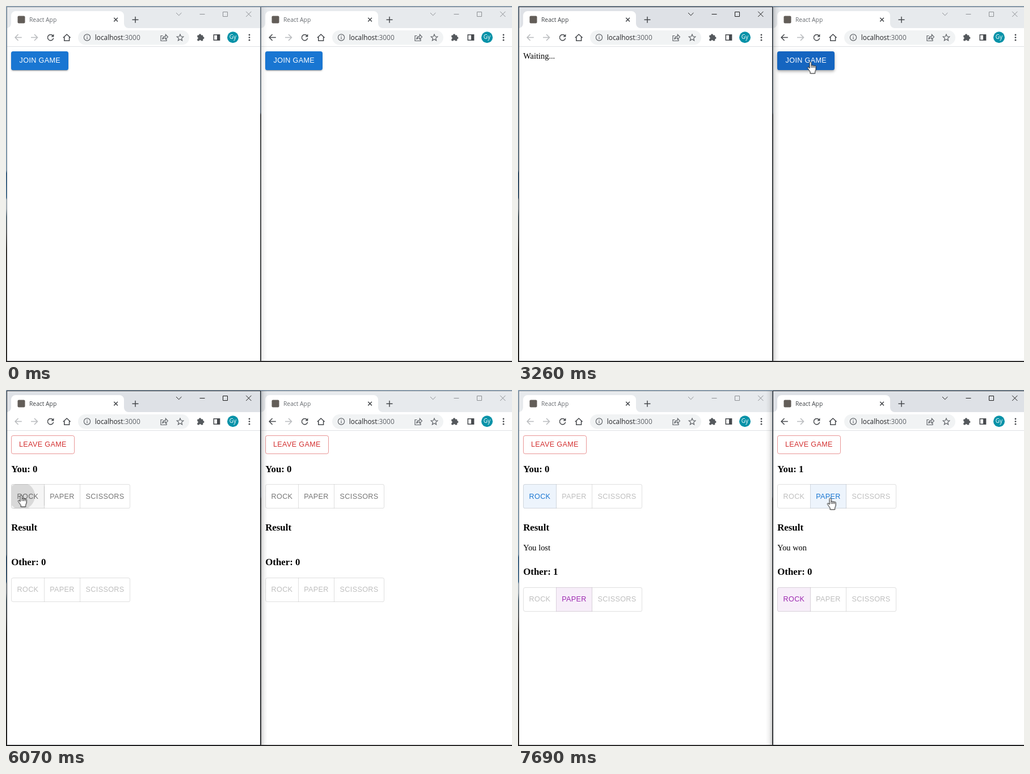
An HTML page that plays this animation: 892x628 px, repeating every 8 s.

```html
<!DOCTYPE html>
<html lang="en">
<head>
<meta charset="utf-8">
<title>Rock paper scissors</title>
<style>
  html, body { margin: 0; width: 100%; height: 100%; overflow: hidden; }
  body {
    position: relative;
    background:
      linear-gradient(#0000 626px, #1d1a18 626px),
      linear-gradient(#9db4c8, #8fa9c0 70px, #8fb0c8 290px, #2f608c 295px, #4a7ba2 338px,
        #c8d4dc 342px, #c0ccd4 358px, #5d7683 372px, #666 400px, #2c2620 430px, #1a1510) 0 0 / 10px 100% no-repeat,
      linear-gradient(#9db4c8, #8aa0b4 160px, #7f98ae 188px, #2b2924 192px, #45443f 300px, #201c18);
  }

  .win {
    --on: 0%; --shade: 0;
    --join: block; --wait: none; --game: none;
    --before: inline; --after: none;
    --btn: #1976d2;
    --lift: 0 3px 1px -2px #0003, 0 2px 2px #00000024, 0 1px 5px #0000001f;
    --leave: #0000; --leave-line: #d32f2f80;
    --mine: #0000008a; --mine-bg: #0000; --rest: #0000008a;
    --theirs: #00000042; --theirs-bg: #0000;
    position: absolute; top: 0; left: 0; width: 449px; height: 628px;
    animation: left 8s step-end infinite;
  }
  .win.right { left: 448px; animation-name: right; }
  .win.left { --shade: .5; }
  .frame {
    position: absolute; left: 1px; top: 1px; width: 446px; height: 624px;
    background: #fff padding-box;
    border: 1px solid color-mix(in srgb, #24272b var(--on), #50555a99);
  }
  .win::after {
    content: ""; position: absolute; z-index: 2; top: 1px; width: 11px; height: 625px;
    opacity: var(--shade);
  }
  .left::after { left: 450px; background: linear-gradient(90deg, #0000002e, #0000000f 45%, #0000); }
  .right::after { left: -11px; background: linear-gradient(270deg, #0000002e, #0000000f 45%, #0000); }

  svg { display: block; position: absolute; }
  .bar { left: 2px; top: 2px; }
  .strip { fill: color-mix(in srgb, #dee1e6 var(--on), #e7eaed); }
  .name { font: 10.3px "Open Sans", sans-serif; fill: color-mix(in srgb, #3f4347 var(--on), #676b70); }
  .url { font: 11.85px "Open Sans", sans-serif; fill: #202124; }
  .url tspan { fill: #5f6368; }
  .who { font: 10px "Open Sans", sans-serif; fill: #fff; text-anchor: middle; }
  .line { fill: none; stroke: #474a4e; stroke-width: 1.5; }
  .thin { fill: none; stroke: #5f6368; stroke-width: 1.2; }
  .ctl { fill: none; stroke: color-mix(in srgb, #1c1c1c var(--on), #8d9094); }
  .off { stroke: #b9bbbe; }

  .view { position: absolute; left: 2px; top: 72.5px; }
  .page { zoom: .9; padding: 8px; font: 16px "Liberation Serif", serif; color: #000; }
  .join { display: var(--join); }
  .wait { display: var(--wait); }
  .game { display: var(--game); }
  .before { display: var(--before); }
  .after { display: var(--after); }
  h3 { font-size: 1.17em; margin: 1em 0; }
  section { padding-bottom: 8px; }
  .btn, .row b {
    font: 14px/1.75 "Liberation Sans", sans-serif; letter-spacing: .02857em;
    white-space: nowrap; box-sizing: border-box; border-radius: 4px;
  }
  .btn { width: max-content; padding: 6px 16px; }
  .join { color: #fff; background: var(--btn); box-shadow: var(--lift); }
  .leave { padding: 5px 14.2px; color: #d32f2f; background: var(--leave); border: 1px solid var(--leave-line); }
  .row { display: flex; }
  .row b { padding: 10.4px; border: 1px solid #0000001f; color: #00000042; }
  .row b + b { margin-left: -1px; border-left-color: #0000; border-top-left-radius: 0; border-bottom-left-radius: 0; }
  .row b:not(:last-child) { border-top-right-radius: 0; border-bottom-right-radius: 0; }
  .row .rest { color: var(--rest); }
  .row .mine { color: var(--mine); background: var(--mine-bg); }
  .row .theirs { color: var(--theirs); background: var(--theirs-bg); }

  @keyframes left {
    15% { --btn: #1565c0; --lift: 0 2px 4px -1px #0003, 0 4px 5px #00000024, 0 1px 10px #0000001f; }
    20%, 75.875% { --on: 100%; --shade: 1; }
    20% { --btn: radial-gradient(circle at 68px 24px, #4484cd 36px, #1565c0 37px); }
    22.5% { --join: none; --wait: block; }
    43.375%, 93.625% { --on: 0%; --shade: 0; }
    45.75% { --wait: none; --game: block; }
    60.75% { --mine-bg: #0000000a; }
    75.875% { --mine-bg: radial-gradient(circle at 19px 22px, #00000026 26px, #0000000a 27px); }
    78.375% { --mine: #1976d2; --mine-bg: #1976d21f; --rest: #00000042; }
    81% { --mine-bg: #1976d214; }
    96.125% { --before: none; --after: inline; --theirs: #9c27b0; --theirs-bg: #9c27b014; }
  }
  @keyframes right {
    38.25% { --btn: #1565c0; --lift: 0 2px 4px -1px #0003, 0 4px 5px #00000024, 0 1px 10px #0000001f; }
    43.375%, 93.625% { --on: 100%; --shade: 1; }
    43.375% { --btn: radial-gradient(circle at 65px 21px, #4484cd 36px, #1565c0 37px); }
    45.75% { --join: none; --game: block; --leave: #d32f2f09; --leave-line: #d32f2f; }
    48.25% { --leave: #d32f2f0a; }
    58.25% { --leave: #d32f2f03; --leave-line: #d32f2fa0; }
    60.75% { --leave: #0000; --leave-line: #d32f2f80; }
    75.875% { --on: 0%; --shade: 0; }
    86.125% { --mine-bg: #00000006; }
    88.625% { --mine-bg: #0000000a; }
    93.625% { --mine-bg: radial-gradient(circle at 39px 28px, #00000026 28px, #0000000a 29px); }
    96.125% {
      --mine: #1976d2; --mine-bg: #1976d214; --rest: #00000042;
      --before: none; --after: inline; --theirs: #9c27b0; --theirs-bg: #9c27b014;
    }
  }

  /* The cursor's position is its hot spot. */
  .cursor {
    --arrow: none; --hand: none;
    left: 0; top: 0; z-index: 3; overflow: visible;
    fill: #fff; stroke: #111; stroke-linejoin: round;
    animation: travel 8s step-end infinite;
  }
  .arrow { display: var(--arrow); }
  .hand { display: var(--hand); }
  @keyframes travel {
    7.5%, 27.75%, 58.25%, 81% { --arrow: inline; --hand: none; }
    15%, 38.25%, 60.75%, 86.125% { --arrow: none; --hand: inline; }
    7.5% { transform: translate(252px, 330px); }
    10% { transform: translate(170px, 190px); }
    12.5% { transform: translate(104px, 124px); }
    15% { transform: translate(73.5px, 102px); }
    17.5% { transform: translate(69.5px, 100px); }
    27.75% { transform: translate(213px, 101px); }
    30.375% { transform: translate(330px, 117px); }
    33% { transform: translate(420px, 121px); }
    35.625% { transform: translate(482px, 116px); }
    38.25% { transform: translate(511.5px, 103px); }
    40.75% { transform: translate(515.5px, 98px); }
    45.75% { transform: translate(517.5px, 97px); }
    50.75% { transform: translate(516.5px, 98px); }
    53.25% { transform: translate(512.5px, 100px); }
    55.75% { transform: translate(497.5px, 105px); }
    58.25% { transform: translate(230px, 198px); }
    60.75% { transform: translate(26.5px, 185px); }
    81% { transform: translate(150px, 191px); }
    83.5% { transform: translate(345px, 196px); }
    86.125% { transform: translate(532.5px, 192px); }
    88.625% { transform: translate(550.5px, 190px); }
  }
</style>
</head>
<body>
<svg class="cursor" width="20" height="24">
  <path class="arrow" d="M.5 .5V15.5L4 12.2 6.3 17.4 8.6 16.4 6.4 11.3H11.2Z"/>
  <g class="hand" transform="translate(-5.5 0)">
    <path d="M5.7 .7C4.7 .7 4.1 1.4 4.1 2.3V12L2.7 10.2C1.8 9.2 .4 9.7 .5 10.9 .5 11.4 .7 11.8 1 12.2L5.2 18.4V21H13.6V18.4L15.2 14V8.7C15.2 7.2 13.2 6.9 12.7 8.1 12.6 6.6 10.5 6.3 10 7.6 9.8 6.1 7.8 5.9 7.3 7.2V2.3C7.3 1.4 6.7 .7 5.7 .7Z"/>
    <path fill="none" d="M7.3 7V11M10 7.6V11M12.7 8.1V11"/>
  </g>
</svg>
<script>
  const row = (pick, cls, other) => '<div class="row">' +
    ['ROCK', 'PAPER', 'SCISSORS'].map(w => `<b class="${w === pick ? cls : other}">${w}</b>`).join('') + '</div>';

  const score = scores => scores
    ? '<span class="before">0</span><span class="after">1</span>' : '<span>0</span>';

  const bar = back => `
    <svg class="bar" width="446" height="70" viewBox="2 2 446 70">
      <path class="strip" d="M2 2H448V39H2Z"/>
      <path fill="#fff" d="M1 39a8 8 0 0 0 8-8V17a8 8 0 0 1 8-8H200a8 8 0 0 1 8 8V31a8 8 0 0 0 8 8Z"/>
      <rect x="20.5" y="17.5" width="13" height="13" rx="2" fill="#625d58"/>
      <text class="name" x="41" y="28">React App</text>
      <path class="line" d="M190.3 20.8l6.6 6.6m0-6.6l-6.6 6.6M222.5 24.2h11M228 18.7v11"/>
      <path class="ctl" d="M300 12l4.7 4.7 4.7-4.7M341.5 14.5h9M382.5 10.5h8v8h-8ZM423.2 9.8l9.2 9.2m0-9.2l-9.2 9.2"/>
      <path class="line ${back}" d="M27.8 55.5H16.5M21.6 50l-5.5 5.5 5.5 5.5"/>
      <path class="line off" d="M44 55.5h11.3M50 50l5.5 5.5-5.5 5.5"/>
      <path class="line" d="M82.6 52.3a5.2 5.2 0 1 0 1.1 4.4"/>
      <path fill="#474a4e" d="M84.4 49.5v5h-5Z"/>
      <path class="line" d="M100.8 56l6.4-6 6.4 6M102.8 54.6V61.3H111.6V54.6"/>
      <rect x="127" y="43" width="196" height="25.5" rx="12.75" fill="#f1f3f4"/>
      <circle class="thin" cx="143" cy="55.5" r="5.6"/>
      <path class="thin" d="M143 54.7v3.8M143 52.3v1.3"/>
      <text class="url" x="156.8" y="60">localhost<tspan>:3000</tspan></text>
      <path class="thin" d="M276.5 52.5H273V61.5H283V58.5M275.8 58.8c.4-3.6 2.6-5.4 5.6-5.4V50.3l4 4.3-4 4.2V56c-2.4 0-4.2.8-5.6 2.8Z"/>
      <path class="thin" d="M307 50l1.6 3.8 4.2.4-3.2 2.7 1 4.1-3.6-2.2-3.6 2.2 1-4.1-3.2-2.7 4.2-.4Z"/>
      <g fill="#55595d">
        <rect x="337.3" y="51.4" width="10" height="10" rx="1"/>
        <circle cx="342" cy="51.3" r="2"/><circle cx="347.4" cy="56.2" r="2"/>
        <g fill="#fff"><circle cx="337" cy="56.6" r="1.7"/><circle cx="342.2" cy="61.8" r="1.7"/></g>
      </g>
      <path class="line" d="M366.3 50.7h10.3v9.6H366.3Z"/>
      <path fill="#474a4e" d="M372 50h5v11h-5Z"/>
      <circle cx="400" cy="55.3" r="10" fill="#0692a8"/>
      <text class="who" x="400" y="58.3">Gy</text>
      <g fill="#474a4e"><circle cx="429" cy="51" r="1.4"/><circle cx="429" cy="55.6" r="1.4"/><circle cx="429" cy="60.2" r="1.4"/></g>
      <path fill="#dfe1e4" d="M2 71H448V72H2Z"/>
    </svg>`;

  const win = (side, mine, theirs, won) => `
    <div class="win ${side}"><div class="frame"></div>${bar(side === 'left' ? 'off' : '')}
      <div class="view"><div class="page">
        <div class="btn join">JOIN GAME</div>
        <div class="wait">Waiting...</div>
        <div class="game">
          <div class="btn leave">LEAVE GAME</div>
          <section><h3>You: ${score(won)}</h3>${row(mine, 'mine', 'rest')}</section>
          <section><h3>Result</h3><div><span class="after">You ${won ? 'won' : 'lost'}</span></div></section>
          <section><h3>Other: ${score(!won)}</h3>${row(theirs, 'theirs', '')}</section>
        </div>
      </div></div>
    </div>`;

  document.body.insertAdjacentHTML('afterbegin',
    win('left', 'ROCK', 'PAPER', false) + win('right', 'PAPER', 'ROCK', true));
</script>
</body>
</html>
```
